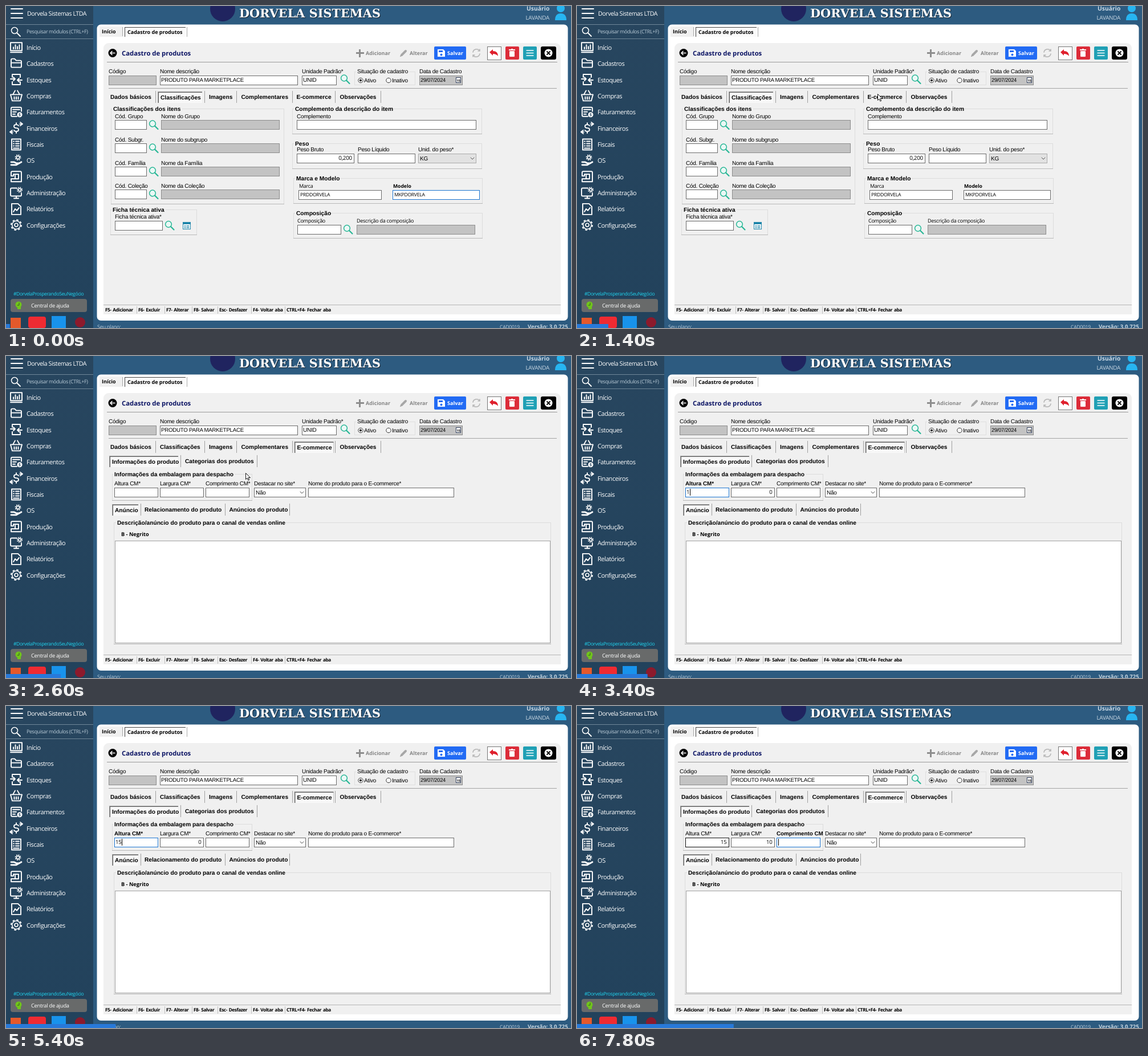
Recreate the animation shown at these times as an HTML page. Size 991 px wide and 565 px high, loop 8 s.

```html
<!DOCTYPE html>
<html lang="pt-BR">
<head>
<meta charset="utf-8">
<title>Cadastro de produtos</title>
<style>
  html, body { margin: 0; width: 100%; height: 100%; overflow: hidden; background: #2d5b80; }
  svg { display: block; width: 991px; height: 565px; }
  text { text-rendering: geometricPrecision; white-space: pre; }
  .label { font: 10px "Liberation Sans", sans-serif; letter-spacing: -.25px; }
  .head { font: bold 10.2px "Liberation Sans", sans-serif; }
  .ui { font: 9px "Open Sans", sans-serif; letter-spacing: -.27px; }
  .bold { font: bold 9px "Open Sans", sans-serif; }
  .hint { font: bold 8.2px "Open Sans", sans-serif; letter-spacing: -.4px; word-spacing: 1px; }
  .side { font: 11px "Open Sans", sans-serif; letter-spacing: -.43px; }
  .brand { font: bold 20.8px "DejaVu Serif", serif; }
  .box { shape-rendering: crispEdges; }
  .line { fill: none; stroke-linecap: round; stroke-linejoin: round; }
</style>
</head>
<body>
<svg viewBox="0 0 991 565">
  <defs>
    <linearGradient id="sideFill" x1="0" y1="0" x2="0" y2="1">
      <stop offset="0" stop-color="#28465f"/><stop offset="1" stop-color="#22425c"/>
    </linearGradient>
  </defs>
  <g id="base"></g>
  <g id="live"></g>
</svg>
<script>
const STEP = 200, LOOP = 8000, BLINK = 530;
const BORDER = '#6b6b6b', FOCUS = '#1b74d0', GRAY = '#c3c3c3';

// Drawing helpers: each returns SVG markup
const text = (x, y, s, cls = 'label', style = '', extra = '') =>
  `<text x="${x}" y="${y}" class="${cls}" style="${style}" ${extra}>${s}</text>`;
const fill = (x, y, w, h, color, r = 0) =>
  `<rect x="${x}" y="${y}" width="${w}" height="${h}" rx="${r}" fill="${color}"/>`;
const box = (x, y, w, h, color = '#fff', stroke = BORDER) =>
  `<rect class="box" x="${x + .5}" y="${y + .5}" width="${w - 1}" height="${h - 1}" fill="${color}" stroke="${stroke}"/>`;
const line = (d, color = '#a8a8a8', width = 1) =>
  `<path class="line" d="${d}" stroke="${color}" stroke-width="${width}"/>`;
const rule = (x, y, w, h, color = '#a8a8a8') =>
  `<rect class="box" x="${x}" y="${y}" width="${w}" height="${h}" fill="${color}"/>`;
const disc = (x, y, r, color, stroke = 'none', width = 1) =>
  `<circle cx="${x}" cy="${y}" r="${r}" fill="${color}" stroke="${stroke}" stroke-width="${width}"/>`;
const at = (x, y, body) => `<g transform="translate(${x} ${y})">${body}</g>`;

const group = (x, y, w, h, caption, capX, capW) =>
  box(x, y, w, h, 'none', '#dcdcdc') + rule(x, y + h - 1, w, 1, '#b8b8b8') +
  fill(capX - 2, y - 2, capW + 4, 5, '#f0f0f0') + text(capX, y + 4, caption, 'head');
const field = (x, y, w, label, labelY, color = '#fff', stroke = BORDER) =>
  (label ? text(x, labelY, label) : '') + box(x, y, w, 17, color, color === GRAY ? '#8c8c8c' : stroke);
const lens = (x, y) => at(x, y,
  disc(-2, -2, 5.4, '#eaf8f5', '#28b796', 1.5) + line('M2 2L7.5 7.5', '#28b796', 2.2));
const arrowDown = (x, y) => line(`M${x} ${y}l3 3l3-3`, '#555');

// A row of tabs: [x, label, right separator, width when selected]
const tabs = (items, chosen, y) => items.map(([x, s, sep, w], i) => {
  const on = i === chosen, left = x - 4;
  return (on ? fill(left, y, w, 20, '#a0a0a0') + fill(left + 1, y + 1, w - 1, 19, '#606060') +
      fill(left + 2, y + 2, w - 2, 18, '#f8f8f8') : '') +
    text(x + (on ? 1 : 0), y + (on ? 14 : 13), s, 'head') + rule(sep, y - 1, 1, 21, '#a0a0a0');
}).join('');

const dashedGear = (x, y, r) =>
  disc(x, y, r, 'none', '#fff', 1.5) +
  `<circle cx="${x}" cy="${y}" r="${r + 1.8}" fill="none" stroke="#fff" stroke-width="2" stroke-dasharray="${(r + 1.8) * Math.PI / 8}"/>`;
const white = d => line(d, '#fff', 1.9);

const menu = [
  ['Início', white('M-10-8h20v14h-20zM-5 3V0M-1.5 3V-4M2 3V-1M5.5 3V-4M-10 9h20')],
  ['Cadastros', white('M-9-6q0-2 2-2h4l3 3h7q2 0 2 2v8q0 2-2 2h-14q-2 0-2-2zM-9-1h18')],
  ['Estoques', white('M-7-4v-5h14v5M-7 4v5h14v-5M-10-1h8M-5-4l3 3l-3 3M10 1h-8M5-2l-3 3l3 3')],
  ['Compras', white('M-10-2h20l-3 11h-14zM-6-2l4-7M6-2l-4-7M-3.5 2v4M0 2v4M3.5 2v4')],
  ['Faturamentos', white('M1 8h-8q-2 0-2-2v-12q0-2 2-2h14q2 0 2 2v5M-6-4h12M-6 0h6M-6 4h4') + disc(6, 5, 4.5, '#fff') + line('M7 3h-2v2h2v2h-2', '#25435d')],
  ['Financeiros', white('M4-4q-1-2-4-2q-4 0-4 3t4 3t4 3t-4 3q-3 0-4-2M0-9v3M0 6v3M-7 4l-4 3l4 3M7-10l4 3l-4 3M-11 7h5M11-7h-5')],
  ['Fiscais', white('M-8-9h16v19h-16zM-5-5h1M-1-5h6M-5-1h1M-1-1h6M-5 3h1M-1 3h6M-5 7h10')],
  ['OS', dashedGear(3, -5, 2.6) + line('M-9 3h5l4 2h4M-9 8h9l9-5', '#fff', 2.8)],
  ['Produção', white('M-9 9h18v-16q0-2-2-2h-14q-2 0-2 2v6h4v-3h9v8h-13zM-2-2v5')],
  ['Administração', white('M1-8h-9q-2 0-2 2v10q0 2 2 2h15q2 0 2-2v-3M-4 10h8M0 6v4') + dashedGear(6, -5, 2.3)],
  ['Relatórios', white('M-8-9h11l5 5v14h-16zM-5 5l3-5l3 3l4-5')],
  ['Configurações', dashedGear(0, 0, 7.2) + disc(0, 0, 3, 'none', '#fff', 1.7)]
];

function sidebar() {
  const items = menu.map(([name, icon], i) => {
    const y = 72.3 + i * 28.36;
    return at(18, y, icon) + text(36, y + 4.5, name, 'side', 'fill:#fff');
  }).join('');
  return fill(0, 0, 153, 565, 'url(#sideFill)') +
    line('M9 5h20M9 13h20M9 21h20', '#fff', 2) +
    text(37, 17, 'Dorvela Sistemas LTDA', 'side', 'font-size:10.6px;fill:#fff') +
    rule(0, 32, 153, 1, '#6f8798') + rule(0, 57, 153, 1, '#6f8798') +
    disc(15, 43, 5.5, 'none', '#fff', 1.5) + line('M19 47l6 6', '#fff', 1.8) +
    text(36, 48, 'Pesquisar módulos (CTRL+F)', 'side', 'font-size:9px;fill:#b9cbd7') + items +
    text(13, 508, '#DorvelaProsperandoSeuNegócio', 'side', 'font-size:8.6px;fill:#20d4ee') +
    fill(8, 514, 134, 23, '#686a6a', 4) +
    disc(22, 524, 5.5, '#70c51b') + fill(20, 526, 6, 6, '#70c51b') + line('M23 521v4h-3', '#365f19') +
    text(44, 529, 'Central de ajuda', 'ui', 'font-size:9.3px;fill:#fff') +
    fill(8, 547, 18, 18, '#e5592b') + fill(39, 545, 31, 20, '#ef2b32', 4) +
    fill(80, 544, 25, 21, '#1893ec') + disc(130, 555, 9, '#8c1a2c');
}

function toolbar() {
  return disc(187, 82.5, 7.5, '#000') + line('M191 82.5h-8M186 79.5l-3 3l3 3', '#fff', 1.7) +
    text(203, 87, 'Cadastro de produtos', 'bold', 'font-size:11.3px;fill:#0b1464') +
    rule(613.5, 81, 14, 3, '#8d8d8d') + rule(619, 75.5, 3, 14, '#8d8d8d') +
    text(631, 86, 'Adicionar', 'bold', 'fill:#858585') +
    line('M694 86l7-7', '#a7a7a7', 4) + line('M692 88l1-1', '#a7a7a7', 2) +
    text(708, 86, 'Alterar', 'bold', 'fill:#858585') +
    fill(751, 71, 56, 23, '#226bf4', 2) +
    '<path d="M757 76h10l3 3v10h-13z" fill="#fff"/>' + fill(759, 78, 7, 3, '#226bf4') + disc(763.5, 85.5, 2, '#226bf4') +
    text(774, 86, 'Salvar', 'bold', 'fill:#fff') +
    line('M819 81a6.5 6.5 0 0 1 12-2v-3M831 79h-3M831 84a6.5 6.5 0 0 1-12 2v3M819 86h3', '#b8b8b8', 1.6) +
    box(844, 71, 25, 24, '#fff', '#777') +
    '<path d="M848 81l6-5v3q9 0 9 9q-3-4-9-4v3z" fill="#df202d"/>' +
    fill(876, 71, 24, 23, '#dc2d3a', 2) + fill(883, 79, 9, 10, '#fff', 1) + rule(882, 76, 11, 2, '#fff') + rule(886, 75, 3, 1, '#fff') +
    fill(907, 71, 24, 23, '#20a0b5', 2) + line('M913 78h12M913 82.5h12M913 87h12', '#fff', 1.3) +
    fill(938, 71, 27, 23, '#000', 3) + disc(951.5, 82.5, 7, '#fff') + line('M949 80l5 5M954 80l-5 5', '#000', 1.8) +
    rule(177, 98, 790, 1, '#9b9b9b');
}

function productHeader() {
  const radio = (x, on) => disc(x, 130.5, 4.2, '#fff', '#333') + (on ? disc(x, 130.5, 2.1, '#222') : '');
  return field(180, 122, 84, 'Código', 118, GRAY) +
    field(270, 122, 242, 'Nome descrição', 118) + text(272, 133, 'PRODUTO PARA MARKETPLACE', 'label', 'font-size:9.7px') +
    field(519, 122, 61, 'Unidade Padrão*', 118) + text(521, 133, 'UNID') + lens(595, 128.5) +
    box(611, 115, 107, 24, 'none', '#dedede') + fill(614, 112, 93, 6, '#f0f0f0') +
    text(616, 118, 'Situação de cadastro') + radio(622, true) + text(628, 134, 'Ativo') +
    radio(671, false) + text(677, 134, 'Inativo') +
    field(725, 122, 76, 'Data de Cadastro', 118, GRAY) +
    text(727, 133, '29/07/2024', 'label', 'font-size:9.3px') +
    box(789, 125, 9, 10, '#fff', '#34415e') + text(790.5, 133, '15', 'bold', 'font-size:5.5px') +
    rule(180, 144, 786, 1, '#a3a3a3');
}

function frame() {
  const keys = [[174, 'F5- Adicionar'], [232, 'F6- Excluir'], [281, 'F7- Alterar'], [329, 'F8- Salvar'],
    [374, 'Esc- Desfazer'], [433, 'F4- Voltar aba'], [492, 'CTRL+F4- Fechar aba']];
  const hints = keys.map(([x, s], i) => (i ? rule(x - 3, 527, 1, 13, '#c0c0c0') : '') +
    text(x, 536, s, 'hint')).join('');
  return fill(0, 0, 991, 565, '#2d5b80') + sidebar() +
    disc(380, 5, 22, '#20245f') +
    text(410, 21, 'DORVELA SISTEMAS', 'brand', 'fill:#15222f') +
    text(409, 19.5, 'DORVELA SISTEMAS', 'brand', 'fill:#fff') +
    text(913, 8, 'Usuário', 'bold', 'font-size:10.4px;fill:#c9d8e3') +
    text(953, 24, 'LAVANDA', 'ui', 'font-size:9.9px;fill:#c9d8e3', 'text-anchor="end"') +
    disc(973, 4, 7, '#27b5f1') + '<path d="M963 25q0-12 10-12t10 12z" fill="#27b5f1"/>' +
    text(160, 566, 'Seu plano:', 'ui', 'fill:#b8cad8') +
    text(866, 566, 'CAD0019', 'ui', 'font-size:8.6px;fill:#b8cad8') +
    text(915, 566, 'Versão: 3.0.725', 'bold', 'font-size:9.6px;fill:#c5d5e0') +
    fill(159.5, 32.5, 826, 519.5, '#fff', 7) +
    fill(164, 36, 41, 18, '#f0f0f0') + text(168, 48, 'Início', 'bold') +
    rule(204, 37, 1, 16) + fill(208, 37, 108, 17, '#fafafa') + rule(208, 37, 107, 1, '#444') + rule(208, 37, 1, 17, '#444') + rule(317, 37, 1, 17) +
    text(213, 49, 'Cadastro de produtos', 'bold') +
    fill(171, 65, 802, 476, '#f0f0f0', 9) + fill(171, 520, 802, 21, '#f0f0f0') +
    rule(171, 524, 802, 1, '#b5b5b5') + hints + toolbar() + productHeader();
}

const mainTabs = [[183, 'Dados básicos', 262], [270, 'Classificações', 348, 78], [356, 'Imagens', 404],
  [412.5, 'Complementares', 502], [509.5, 'E-commerce', 577, 69], [585.5, 'Observações', 657]];

function classification(focused) {
  const rows = [['Grupo', 'Grupo'], ['Subgr.', 'subgrupo'], ['Família', 'Família'], ['Coleção', 'Coleção']];
  const codes = rows.map(([code, name], i) => {
    const y = 200 + Math.round(i * 40.8);
    return field(191, y, 56, 'Cód. ' + code, y - 3.5) + lens(259, y + 8.5) +
      field(272, y, 208, `Nome d${i < 2 ? 'o' : 'a'} ${name}`, y - 3.5, GRAY);
  }).join('');
  return group(184, 180, 304, 168, 'Classificações dos itens', 188, 119) + codes +
    group(183, 357, 152, 45, 'Ficha técnica ativa', 187, 91) +
    field(191, 377, 84, 'Ficha técnica ativa*', 373) + lens(287, 385) +
    box(310, 379, 14, 13, '#fff', '#2186aa') + rule(310, 379, 14, 4, '#2186aa') +
    line('M313 386h2M317 386h4M313 389h2M317 389h4', '#2186aa', 1.3) +
    group(502, 180, 333, 45, 'Complemento da descrição do item', 507, 170) +
    field(510, 200, 315, 'Complemento', 197) +
    group(502, 241, 333, 45, 'Peso', 507, 25) +
    field(510, 259, 101, 'Peso Bruto', 255) + text(607, 270, '0,200', 'ui', 'font-size:9.9px', 'text-anchor="end"') +
    field(617, 259, 101, 'Peso Líquido', 255) +
    field(723, 259, 102, 'Unid. do peso*', 255, '#e2e2e2', '#aaa') + text(726, 271, 'KG') + arrowDown(815, 266) +
    group(504, 302, 332, 45, 'Marca e Modelo', 509, 71) +
    text(514, 319, 'Marca', 'ui') + box(513, 323, 146, 17) + text(516, 334, 'PRDDORVELA', 'ui', 'font-size:8.6px') +
    text(679, 319, 'Modelo', 'bold', 'font-size:8.6px') + box(678, 323, 153, 17, '#fff', focused ? FOCUS : BORDER) +
    text(681, 334, 'MKPDORVELA', 'ui', 'font-size:8.6px') +
    group(504, 363, 332, 45, 'Composição', 509, 53) +
    text(511, 380, 'Composição', 'ui') + field(511, 384, 77) + lens(600, 392) +
    text(615, 380, 'Descrição da composição', 'ui') + field(615, 384, 208, '', 0, GRAY);
}

const sizes = [[190, 'Altura CM'], [270, 'Largura CM'], [350, 'Comprimento CM']];

function sizeField(i, value, focused, caretOn) {
  const [x, name] = sizes[i];
  const clipped = focused && i === 2;
  const stroke = focused ? FOCUS : value === '15' ? '#111' : BORDER;
  const caretX = x + 2.5 + value.length * 5;
  return text(x, 227, name + (clipped ? '' : '*'), focused ? 'head' : 'label', focused ? 'font-size:9.8px' : '') +
    box(x, 231, 77, 17, '#fff', stroke) +
    (focused ? text(x + 2, 242, value, 'ui', 'font-size:9.6px') + (caretOn ? rule(Math.round(caretX), 233, 1, 12, '#000') : '')
      : text(x + 72.5, 242, value, 'ui', 'font-size:9.6px', 'text-anchor="end"'));
}

function commerce(state, caretOn) {
  return tabs([[185, 'Informações do produto', 306, 121], [314, 'Categorias dos produtos', 440]], 0, 175) +
    group(186, 207, 246, 47, 'Informações da embalagem para despacho', 190, 209) +
    sizes.map((_, i) => sizeField(i, state.values[i], state.focus === i, caretOn)).join('') +
    field(435, 231, 91, 'Destacar no site*', 227) + text(438, 243, 'Não') + arrowDown(516, 238) +
    field(530, 231, 256, 'Nome do produto para o E-commerce*', 227) +
    tabs([[190, 'Anúncio', 236, 46], [243, 'Relacionamento do produto', 384], [391.5, 'Anúncios do produto', 497]], 0, 260) +
    group(189, 292, 767, 214, 'Descrição/anúncio do produto para o canal de vendas online', 195, 293) +
    text(202, 316, 'B - Negrito', 'bold', 'font-size:9.2px') +
    box(191, 324, 764, 180, '#fff', '#a0a0a0');
}

// [time, focus, altura, largura]; page two opens at 1600
const steps = [
  [0, 'model', '', ''], [1200, null, '', ''], [3000, 0, '', '0'], [3400, 0, '1', '0'],
  [5200, 0, '15', '0'], [5800, 1, '15', ''], [6200, 1, '15', '1'], [6400, 1, '15', '10'], [6600, 2, '15', '10']
];
// [time, x, y]; no position hides the pointer
const pointer = [
  [0], [600, 931, 330], [800, 800, 250], [1000, 600, 178], [1200, 527, 154], [2000, 525, 158],
  [2200, 521, 166], [2400, 516, 176], [2600, 420, 205], [2800, 300, 230], [3000, 225, 236], [3200]
];
const latest = (table, t) => table.findLast(row => row[0] <= t);

function scene(t) {
  const [since, focus, height, width] = latest(steps, t);
  const [, x, y] = latest(pointer, t);
  const caretOn = Math.floor((t - since) / BLINK) % 2 === 0;
  const second = t >= 1600;
  const state = { focus, values: [height, width, ''] };
  return tabs(mainTabs, second ? 4 : 1, 150) +
    (second ? commerce(state, caretOn) : classification(focus === 'model')) +
    fill(0, 558, 6.87 * (t / STEP + 1), 7, '#2879d9') +
    (x ? at(x, y, '<path d="M.5.5v11l2.6-2.4l1.8 4l1.8-.8l-1.8-3.8h3.6z" fill="#fff" stroke="#000" stroke-width=".9"/>') : '');
}

document.getElementById('base').innerHTML = frame();
const live = document.getElementById('live');
const start = performance.now();
let shown = -1;
function play(now) {
  const t = Math.floor(Math.max(0, now - start) % LOOP / STEP) * STEP;
  if (t !== shown) live.innerHTML = scene(shown = t);
  requestAnimationFrame(play);
}
play(start);
</script>
</body>
</html>
```
